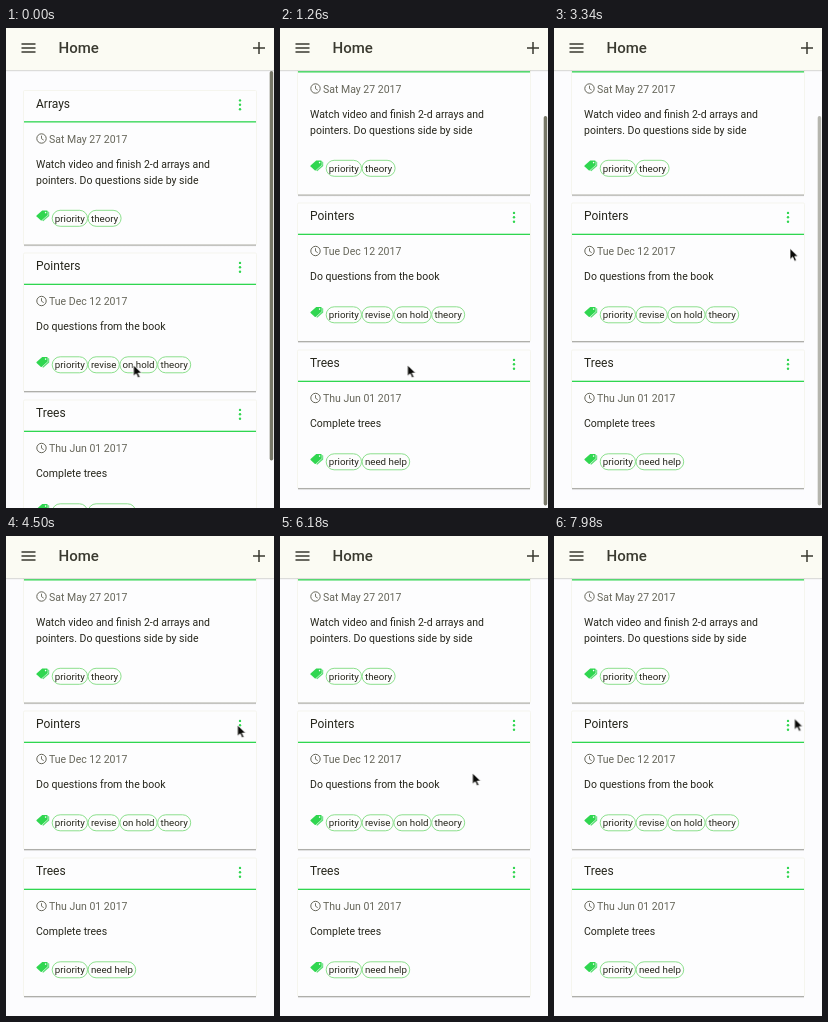
An HTML page for the animation above (8000 ms loop, 268 by 480 pixels).

```html
<!DOCTYPE html>
<html lang="en">
<head>
<meta charset="utf-8">
<title>Home</title>
<style>
  html, body { margin: 0; width: 100%; height: 100%; overflow: hidden; background: #fcfcfe; }
  svg { display: block; width: 268px; height: 480px; font-family: Roboto, sans-serif; fill: #26261c; }
  .title { font-size: 12px; }
  .body { font-size: 10.5px; }
  .date { font-size: 10.5px; fill: #66665a; }
  .chip { font-size: 9.75px; text-anchor: middle; }
  .pill { fill: #fdfdfd; stroke: #7fdc80; stroke-width: .9; }
  .green { fill: #30d650; }
  .home { font-size: 15px; font-weight: 500; fill: #3a3a30; }
  .line { fill: none; stroke: #3a3a30; stroke-width: 1.5; }
</style>
</head>
<body>
<svg viewBox="0 0 268 480">
  <defs>
    <g id="clock" fill="none" stroke="#66665a">
      <circle r="4.7"/>
      <path d="M0-2.8V.2L2.2 1.6" stroke-width=".9"/>
    </g>
    <g id="tag" class="green">
      <path d="M12 1.4L13 2V5.8L7 11.2 6 10.4 12 5Z" opacity=".8"/>
      <path d="M6 .4H10.6Q11.5 .4 11.5 1.3V5L5.6 10.2Q5 10.6 4.5 10.2L.4 6.3Q0 5.8 .4 5.3Z"/>
      <circle cx="9.4" cy="2.5" r=".8" fill="#fcfcfe"/>
    </g>
    <linearGradient id="shade" x2="0" y2="1">
      <stop stop-color="#a8a8a4"/>
      <stop offset="1" stop-color="#fcfcfe"/>
    </linearGradient>
  </defs>

  <rect width="268" height="480" fill="#fcfcfe"/>
  <g id="cards"></g>
  <g id="scrollbar">
    <rect id="thumb" x="263.7" y="43" width="3.5" height="389.5" rx="1.7" fill="#777768"/>
  </g>

  <rect width="268" height="42" fill="#fbfbf3"/>
  <rect y="42" width="268" height="1.2" fill="#70705a" opacity=".22"/>
  <path class="line" d="M15.5 16H29.5M15.5 20H29.5M15.5 24H29.5"/>
  <text class="home" x="52.5" y="25.3">Home</text>
  <path class="line" d="M247 20H259M253 14V26"/>

  <path id="cursor" d="M0 0V11.2L2.7 8.8 4.5 12.8 6.5 11.9 4.7 8.1H8.3Z"
        fill="#0a0a08" stroke="#fff" stroke-width=".8" stroke-linejoin="round"/>
</svg>
<script>
const DURATION = 8000;
const cards = [
  { top: 62.5, title: 'Arrays', date: 'Sat May 27 2017',
    lines: ['Watch video and finish 2-d arrays and', 'pointers. Do questions side by side'],
    chips: ['priority', 'theory'] },
  { top: 225, title: 'Pointers', date: 'Tue Dec 12 2017',
    lines: ['Do questions from the book'],
    chips: ['priority', 'revise', 'on hold', 'theory'] },
  { top: 372, title: 'Trees', date: 'Thu Jun 01 2017',
    lines: ['Complete trees'],
    chips: ['priority', 'need help'] }
];
const chipWidth = { priority: 35.3, theory: 33, revise: 31.2, 'on hold': 37.2, 'need help': 47.6 };

const text = (kind, x, y, value) => `<text class="${kind}" x="${x}" y="${y}">${value}</text>`;

function drawChips(names, y) {
  let x = 46.2;
  return names.map(name => {
    const width = chipWidth[name], left = x;
    x += width + .6;
    return `<rect class="pill" x="${left}" y="${y - 8}" width="${width}" height="16" rx="8"/>` +
      text('chip', left + width / 2, y + 3.4, name);
  }).join('');
}

function drawCard({ top, title, date, lines, chips }) {
  const extra = (lines.length - 1) * 16;
  const chipY = 111.8 + extra, height = 138 + extra;
  const dots = [-4.4, 0, 4.4].map(dy =>
    `<circle class="green" cx="234" cy="${14.3 + dy}" r="1.2"/>`).join('');
  return `<g transform="translate(0 ${top})">
    <rect x="18" y="${height}" width="232" height="2.2" fill="url(#shade)"/>
    <rect x="17.5" width="233" height="${height + .4}" rx="1.2" fill="#fdfdfe" stroke="#f3f3ea" stroke-width=".8"/>
    <path d="M18 ${height + .5}H250" stroke="#a8a8a4" stroke-width=".9"/>
    <rect class="green" x="18" y="30.7" width="232" height="1.3"/>
    ${text('title', 30, 17.2, title)}${dots}
    <use href="#clock" x="35.5" y="48"/>
    ${text('date', 43, 52.2, date)}
    ${lines.map((line, i) => text('body', 30, 77.2 + i * 16, line)).join('')}
    <use href="#tag" x="30.2" y="${chipY - 8.2}"/>
    ${drawChips(chips, chipY)}
  </g>`;
}

const byId = id => document.getElementById(id);
byId('cards').innerHTML = cards.map(drawCard).join('');

function play(id, steps, toStyle) {
  byId(id).animate(steps.map(([time, ...values]) => ({
    offset: time / DURATION,
    easing: 'ease-in-out',
    ...toStyle(...values)
  })), { duration: DURATION, iterations: Infinity });
}

const move = (x, y) => ({ transform: `translate(${x}px, ${y}px)` });
const fade = opacity => ({ opacity });
const scroll = distance => [[0, 0, 0], [1000, 0, 0], [1240, 0, distance], [DURATION, 0, distance]];

play('cards', scroll(-50), move);
play('thumb', scroll(45), move);
play('scrollbar', [[0, 1], [3100, 1], [3600, 0], [DURATION, 0]], fade);
play('cursor', [
  [0, 127.5, 337], [1560, 127.5, 337], [2400, 236, 220.5], [3300, 236, 220.5],
  [4100, 231.5, 189], [5020, 231.5, 189], [5800, 192.5, 237], [6700, 192.5, 237],
  [7500, 240.5, 182.5], [DURATION, 240.5, 182.5]
], move);
</script>
</body>
</html>
```
